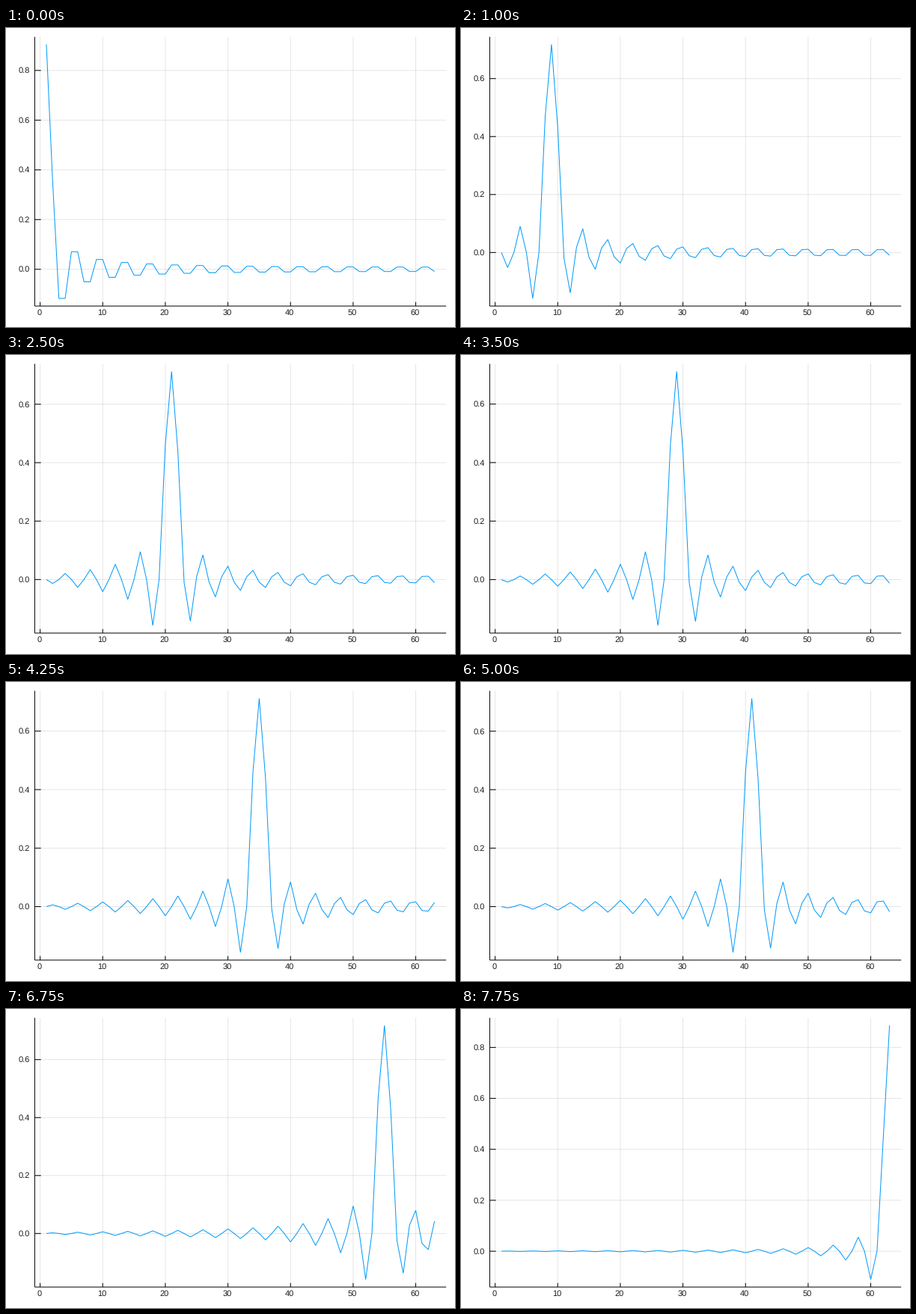
These frames come from a looping animation (600x400 px, 8 s). A matplotlib script:

```python
import numpy as np
import matplotlib.pyplot as plt
from matplotlib.animation import FuncAnimation

W, H, DPI = 600, 400, 100
PX = 72 / DPI                                   # one pixel in points
LEFT, RIGHT, TOP, BOTTOM = 38.4, 588.2, 11.8, 372.0
X_TICK = 0.015 * (BOTTOM - TOP)
Y_TICK = 0.015 * (RIGHT - LEFT)
N, MODES = 63, 32

plt.rcParams["text.hinting"] = "none"


def basis():
    """Orthonormal low-pass functions, triangular on every second sample."""
    x = np.arange(N) + 0.5
    m = np.arange(MODES)
    dct = np.cos(np.pi * np.outer(x, m) / N) * np.sqrt(2 / N)
    dct[:, 0] /= np.sqrt(2)
    q, _ = np.linalg.qr(dct[::2].T)
    v = dct @ q
    peaks = v[2 * m, m]
    return v * np.sign(peaks)


def widen(lo, hi):
    pad = 0.03 * (hi - lo)
    return lo - pad, hi + pad


def scale(value, lim, a, b):
    return a + (value - lim[0]) / (lim[1] - lim[0]) * (b - a)


waves = basis()
samples = np.arange(1, N + 1)
xlim = widen(1, N)

fig = plt.figure(figsize=(W / DPI, H / DPI), dpi=DPI, facecolor="white")
ax = fig.add_axes([0, 0, 1, 1])
ax.set_xlim(0, W)
ax.set_ylim(H, 0)
ax.axis("off")


def rule(xs, ys, alpha=1.0, z=3):
    return ax.plot(xs, ys, color="black", alpha=alpha, lw=PX, zorder=z,
                   solid_capstyle="butt", snap=False)[0]


def label(x, y, text, ha):
    return ax.text(x, y, text, ha=ha, va="baseline", fontsize=11 * PX,
                   family="Liberation Sans", color="#1a1a1a")


for t in range(0, 61, 10):
    px = scale(t, xlim, LEFT, RIGHT)
    rule([px, px], [TOP, BOTTOM], alpha=0.1, z=1)
    rule([px, px], [BOTTOM - X_TICK, BOTTOM])
    label(px - 1, 384.2, str(t), "center")

rule([LEFT, LEFT], [TOP, BOTTOM])
rule([LEFT, RIGHT], [BOTTOM, BOTTOM])

y_ticks = [0.0, 0.2, 0.4, 0.6, 0.8]
rows = [(rule([LEFT, RIGHT], [0, 0], alpha=0.1, z=1),
         rule([LEFT, LEFT + Y_TICK], [0, 0]),
         label(31.5, 0, f"{t:.1f}", "right")) for t in y_ticks]

curve, = ax.plot([], [], color="#009afa", lw=PX, zorder=2, snap=False,
                 solid_joinstyle="miter", solid_capstyle="butt")


def update(k):
    wave = waves[:, k]
    ylim = widen(wave.min(), wave.max())
    curve.set_data(scale(samples, xlim, LEFT, RIGHT),
                   scale(wave, ylim, BOTTOM, TOP))
    for t, (grid, tick, text) in zip(y_ticks, rows):
        py = scale(t, ylim, BOTTOM, TOP)
        grid.set_ydata([py, py])
        tick.set_ydata([py, py])
        text.set_y(py + 3.6)
        for part in (grid, tick, text):
            part.set_visible(t <= ylim[1])
    return [curve] + [part for row in rows for part in row]


anim = FuncAnimation(fig, update, frames=MODES, interval=250,
                     repeat=True, repeat_delay=0, blit=False)
plt.show()
```
